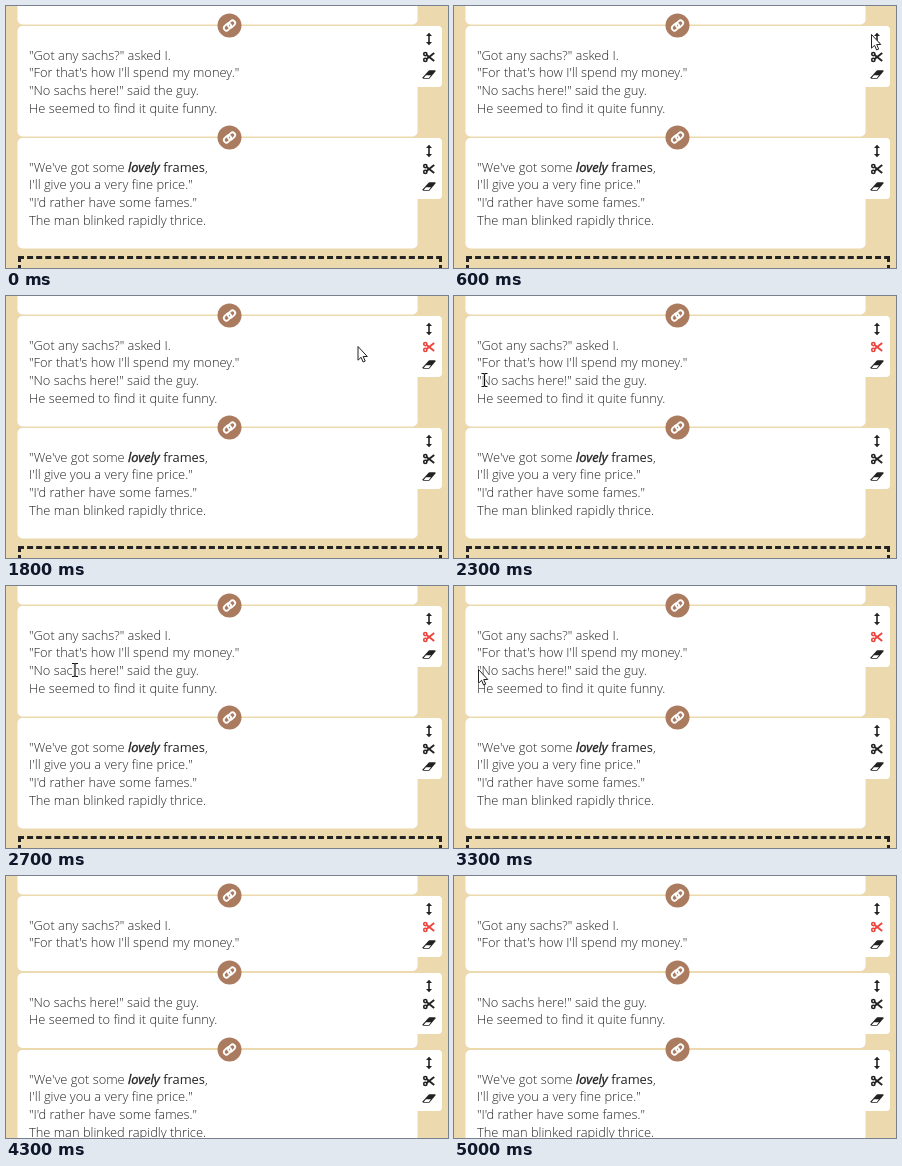
Recreate the animation shown at these times as an HTML page. Size 442 by 262 pixels, loop 5.1 s.

```html
<!DOCTYPE html>
<html lang="en">
<head>
<meta charset="utf-8">
<title>Splitting a stanza</title>
<style>
  html, body { margin: 0; width: 100%; height: 100%; overflow: hidden; background: #ecd9ae; }
  svg { display: block; width: 442px; height: 262px; }
  text { font: 300 12.88px "Open Sans", "Noto Sans", sans-serif; fill: #262626; }
  .em { font-weight: 400; font-style: italic; fill: #222; stroke: #222; stroke-width: .35px; }
  .mid { font-weight: 400; fill: #222; }
  .icon { color: #222; }
  .armed { color: #f0443e; }
</style>
</head>
<body>
<svg viewBox="0 0 442 262">
  <defs>
    <g id="link">
      <circle r="12" fill="#ab7b60"/>
      <g transform="rotate(-45)" fill="none" stroke="#fff" stroke-width="1.8">
        <rect x="-6.5" y="-3" width="8" height="5.2" rx="2.5"/>
        <rect x="-1.5" y="-2.2" width="8" height="5.2" rx="2.5"/>
      </g>
    </g>
    <g id="move" fill="currentColor">
      <path d="M0-6.3 3-3H.8V3H3L0 6.3-3 3H-.8V-3H-3Z"/>
    </g>
    <g id="cut" fill="none" stroke="currentColor">
      <g stroke-width="1.6">
        <circle cx="-3.7" cy="-2.9" r="1.6"/>
        <circle cx="-3.7" cy="2.9" r="1.6"/>
      </g>
      <path d="M-2.4-2 5.2 4M-2.4 2 5.2-4" stroke-width="1.9"/>
    </g>
    <g id="erase">
      <path d="M-6.3 2.8-.2-4Q.1-4.3.7-4.3H5.8Q7-4.3 6.4-2.9L.5 3.9Q.1 4.3-.4 4.3H-5.5Q-7 4.2-6.3 2.8Z" fill="currentColor"/>
      <path d="M-5.3 3.4H-.2L2 .85H-3.1Z" fill="#fff"/>
    </g>
    <path id="arrow" d="M.5.5V14.2L3.6 11.3 5.6 16 7.7 15.1 5.7 10.5H9.8Z" fill="#fff" stroke="#222" stroke-width="1"/>
    <g id="beam" fill="none">
      <path d="M-3-6.5H-1L0-5.7 1-6.5H3M0-5.7V5.7M-3 6.5H-1L0 5.7 1 6.5H3" stroke="#fff" stroke-width="2.4"/>
      <path d="M-3-6.5H-1L0-5.7 1-6.5H3M0-5.7V5.7M-3 6.5H-1L0 5.7 1 6.5H3" stroke="#111" stroke-width="1.2"/>
    </g>
    <path id="hand" d="M-1.5 1.5Q0-.5 1.5 1.5V7.5L9 9Q10.5 9.6 10.5 11.5V15L8.5 20.5H0L-5 13.5Q-5.5 11-3.5 11.5L-1.5 13Z" fill="#fff" stroke="#222"/>
  </defs>
  <rect width="442" height="262" fill="#ecd9ae"/>
  <g id="whole"></g>
  <g id="split"></g>
  <use id="pointer"/>
</svg>
<script>
const LOOP = 5100, STEP = 100, LEADING = 17.7;
const SPLIT_AT = 3400, ARMED_AT = 1300;

const first = ['"Got any sachs?" asked I.', '"For that\'s how I\'ll spend my money."'];
const second = ['"No sachs here!" said the guy.', 'He seemed to find it quite funny.'];
const third = [
  '"We\'ve got some <tspan class="em">lovely</tspan> <tspan class="mid">frames</tspan>,',
  'I\'ll give you a very fine price."',
  '"I\'d rather have some fames."',
  'The man blinked rapidly thrice.'
];

// time, x, y, shape
const path = [
  [100, 60, 236, 'arrow'], [600, 417, 28, 'arrow'], [800, 431, 9, 'arrow'],
  [1100, 429, 49, 'arrow'], [1200, 421, 50, 'hand'], [1300, 421, 50, 'hand'],
  [1400, 415, 40, 'arrow'], [1500, 400, 34, 'arrow'], [1800, 351.5, 50, 'arrow'],
  [1900, 300, 58, 'arrow'], [2000, 190, 76, 'beam'], [2200, 48, 84, 'beam'],
  [2300, 30.5, 84, 'beam'], [2400, 24, 83, 'arrow'], [2500, 42, 84, 'beam'],
  [2700, 69, 84, 'beam'], [2900, 34, 84, 'beam'], [3000, 24, 83, 'arrow'],
  [4300, 24, 83, 'arrow']
];

const $ = id => document.getElementById(id);
const icon = (id, x, y, cls = 'icon') => `<use href="#${id}" x="${x}" y="${y}" class="${cls}"/>`;
const sheet = (y, h) => `<rect x="11.5" y="${y}" width="400" height="${h}" rx="5" fill="#fff"/>`;

function card(top, height, lines, cutClass) {
  const text = lines.map((s, i) =>
    `<text x="23" y="${top + 33.5 + i * LEADING}">${s}</text>`).join('');
  return sheet(top, height) +
    `<path d="M405 ${top}H432q4 0 4 4v53q0 4-4 4H405z" fill="#fff"/>` + text +
    icon('move', 423, top + 13) +
    icon('cut', 423, top + 31, cutClass) +
    icon('erase', 423, top + 48.5);
}

const links = tops => tops.map(y => icon('link', 223.5, y - 0.5)).join('');
const above = sheet(-20, 38.5);
const dropBox = `<g stroke="#222" stroke-width="3" stroke-dasharray="6 3.09">
  <path d="M12 251.5H436M13.5 250V262M434.5 250V262"/></g>`;

$('whole').innerHTML = above + card(20, 110.5, first.concat(second), 'icon first-cut') +
  card(132, 110.5, third) + links([20, 132]) + dropBox;
$('split').innerHTML = above + card(20, 75, first, 'armed') + card(97, 75, second) +
  card(174, 110.5, third) + links([20, 97, 174]);

const whole = $('whole'), split = $('split'), pointer = $('pointer');
const scissors = whole.querySelector('.first-cut');

function draw(ms) {
  const t = Math.floor(ms / STEP) * STEP;
  whole.style.display = t < SPLIT_AT ? '' : 'none';
  split.style.display = t < SPLIT_AT ? 'none' : '';
  scissors.setAttribute('class', t < ARMED_AT ? 'icon' : 'armed');

  const i = path.findIndex((p, n) => n + 1 < path.length && t >= p[0] && t < path[n + 1][0]);
  pointer.style.display = i < 0 ? 'none' : '';
  if (i < 0) return;
  const [a, b] = [path[i], path[i + 1]];
  const k = (t - a[0]) / (b[0] - a[0]);
  pointer.setAttribute('href', '#' + a[3]);
  pointer.setAttribute('x', a[1] + (b[1] - a[1]) * k);
  pointer.setAttribute('y', a[2] + (b[2] - a[2]) * k);
}

const start = performance.now();
function tick() {
  draw((performance.now() - start) % LOOP);
  requestAnimationFrame(tick);
}
draw(0);
tick();
</script>
</body>
</html>
```
